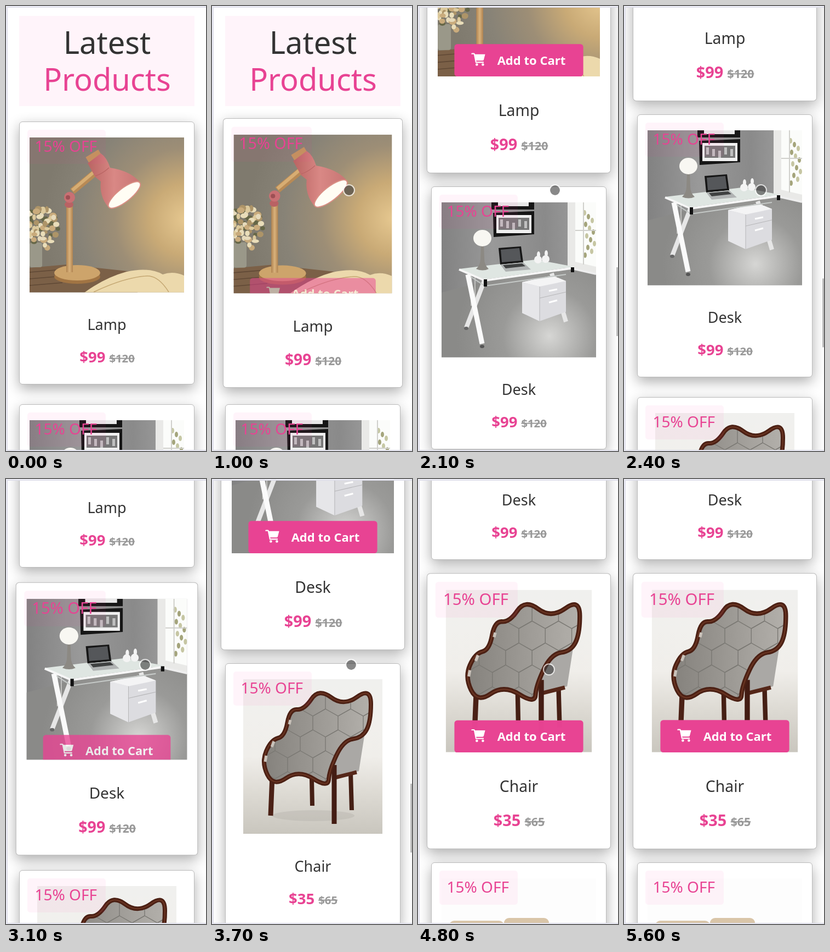
These frames come from a looping animation (365x809 px, 6000 ms). An HTML page:

```html
<!DOCTYPE html>
<html lang="en">
<head>
<meta charset="utf-8">
<title>Latest Products</title>
<style>
  html, body { margin: 0; width: 100%; height: 100%; overflow: hidden; background: #ededf6; }
  #view { position: absolute; left: 2px; top: 2px; width: 363px; height: 806px; overflow: hidden;
    background: #fff; border: 1px solid #d9d9e6; border-right: 0; box-sizing: border-box; }
  #page { position: absolute; left: -3px; top: -3px; width: 365px; height: 2300px; }
  svg { position: absolute; left: 0; top: 0; overflow: visible; font-family: "Noto Sans", "Open Sans", sans-serif; }
  .card { position: absolute; left: 24px; width: 320px; height: 478px; box-sizing: border-box;
    background: #fff; border: 1px solid #bbb; border-radius: 6px; box-shadow: 0 8px 24px rgba(0,0,0,.32); }
  .card svg { left: -1px; top: -1px; }
  .mid { text-anchor: middle; }
  .pink { fill: #e84393; }
  .dark { fill: #333; }
  .old { fill: #999; font-size: 20.3px; text-decoration: line-through; }
  #bar { position: absolute; left: 362px; top: 0; width: 3px; height: 125px; background: #bcbcbc; }
  #dot { position: absolute; left: -11px; top: -11px; width: 18px; height: 18px; border-radius: 50%;
    background: rgba(64,64,64,.62); background-clip: padding-box; border: 2px solid rgba(255,255,255,.7); }
</style>
</head>
<body>
<div id="view"><div id="page">
  <svg width="365" height="200">
    <rect x="24" y="18" width="320" height="164" fill="#ff3399" opacity=".05"/>
    <g font-size="56" class="mid">
      <text x="184.5" y="86.5" class="dark">Latest</text>
      <text x="184.5" y="154" class="pink">Products</text>
    </g>
  </svg>
</div></div>
<div id="bar"></div>
<div id="dot"></div>
<script>
const rect = (x, y, w, h, fill, more = '') =>
  `<rect x="${x}" y="${y}" width="${w}" height="${h}" fill="${fill}" ${more}/>`;
const oval = (x, y, rx, ry, fill, more = '') =>
  `<ellipse cx="${x}" cy="${y}" rx="${rx}" ry="${ry}" fill="${fill}" ${more}/>`;
const shape = (d, fill, more = '') => `<path d="${d}" fill="${fill}" ${more}/>`;
const line = (d, color, w = 1) => shape(d, 'none', `stroke="${color}" stroke-width="${w}"`);
const loop = (n, draw) => Array.from({ length: n }, (_, i) => draw(i)).join('');

// evenly spaced colour stops
const stops = colors => colors.map((c, i) =>
  `<stop offset="${i / (colors.length - 1)}" stop-color="${c}"/>`).join('');
const fade = (id, colors, down) =>
  `<linearGradient id="${id}" ${down ? 'x2="0" y2="1"' : ''}>${stops(colors)}</linearGradient>`;
const glow = (id, x, y, r, ...colors) =>
  `<radialGradient id="${id}" gradientUnits="userSpaceOnUse" cx="${x}" cy="${y}" r="${r}">${stops(colors)}</radialGradient>`;

// closed curve through the midpoints of a rough outline
function blob(p) {
  const mid = i => {
    const a = p[i % p.length], b = p[(i + 1) % p.length];
    return `${(a[0] + b[0]) / 2} ${(a[1] + b[1]) / 2}`;
  };
  return `M${mid(0)}${loop(p.length, i => `Q${p[(i + 1) % p.length]} ${mid(i + 1)}`)}Z`;
}

function flowers() {
  let seed = 7;
  const rnd = () => (seed = seed * 16807 % 2147483647) / 2147483647;
  const tones = ['#e9ddb9', '#c9ab7c', '#e6dabb', '#ad9468', '#dcc99c'];
  return loop(80, i => {
    const a = rnd() * 6.28, r = Math.sqrt(rnd());
    return oval(63 + 33 * r * Math.cos(a), 405 + 38 * r * Math.sin(a), 3 + 4 * rnd(), 3 + 3 * rnd(),
      i < 28 ? '#666747' : tones[i % 5]);
  });
}

const lamp = () => glow('light', 328, 388, 260, '#e6c890', '#c9aa76', '#9d8e76', '#888377', '#7f7a6e')
  + fade('shade', ['#b96462', '#d98885', '#c77573']) + fade('wood', ['#b08350', '#d9b27c', '#b08350'])
  + rect(43, 239, 282, 282, 'url(#light)')
  + shape('M43 476L110 470L240 484V521H43Z', '#7b6047')
  + loop(3, i => line(`M43 ${484 + 12 * i}l60 -5`, '#5f4835', 1.5))
  + rect(43, 430, 23, 45, '#a5a594', 'opacity=".7" rx="4"') + flowers()
  + shape('M143 521Q180 494 220 483Q262 474 286 488Q305 481 325 490V521Z', '#ecd9ac')
  + line('M160 520Q215 494 254 491Q277 488 297 520', '#c5a873', 1.5)
  + oval(130, 492, 42, 13, '#a17443') + oval(130, 485, 42, 14, '#cda46b')
  + rect(110, 362, 12, 122, 'url(#wood)')
  + line('M121 337L166 300', '#b88a55', 12) + line('M121 335L165 298', '#d7ad73', 6)
  + oval(115, 361, 8, 6, '#b96264') + oval(116, 348, 10, 10, '#c97073') + oval(113, 348, 4, 4, '#9e4f54')
  + line('M149 281L172 267', '#c2955d', 14)
  + shape('M149 286L173 268Q184 275 190 294Q228 300 245 321L187 366Q170 346 173 319L163 311Z', 'url(#shade)')
  + line('M163 309Q176 305 188 294', '#b86463', 1.2)
  + oval(216, 343.5, 36, 12, '#fffdf4', 'transform="rotate(-38 216 343.5)" stroke="#d98f84" stroke-width="2"');

const desk = () => fade('wall', ['#828282', '#999', '#8a8a8a', '#a5a5a5'])
  + glow('floor', 240, 600, 170, '#d6d6d4', '#9a9a98', '#8a8a88')
  + rect(43, 357, 282, 282, 'url(#wall)')
  + shape('M43 521L245 468L325 488V639H43Z', 'url(#floor)')
  + shape('M273 357H325V486L273 474Z', '#e9e9e7') + shape('M287 357H325V474L287 465Z', '#fbfcfa')
  + loop(12, i => oval(304 + i * 7 % 19, 376 + i * 7, 3, 5, i % 2 ? '#8f8f5c' : '#b9ba8e', 'opacity=".8"'))
  + line('M302 357V470M287 408H325', '#d0d0cc', 2) + line('M245 469L325 487', '#eee', 4)
  + rect(134, 357, 78, 13, '#161616') + rect(146, 357, 56, 7, '#e8e8e8')
  + shape('M137 376L212 373V415L138 420Z', '#161616') + rect(143, 380, 64, 33, '#f0f0f0')
  + rect(147, 385, 56, 22, '#777') + loop(5, i => rect(150 + i * 11, 388 + i % 3 * 3, 5, 13, '#c0c0c0'))
  + loop(4, i => line(`M${[97, 104, 246, 252][i]} 490v${i < 2 ? 55 : 12}`, '#d0d0ce', 1.5))
  + line('M122 497L88 585M244 486L270 574', '#e6e6e6', 8) + line('M91 488L117 614', '#fafafa', 9)
  + oval(117, 619, 4, 3, '#555') + oval(88, 586, 4, 3, '#666')
  + shape('M190 502L245 490L270 500V556L222 573L190 558Z', '#dcdce0') + shape('M190 502L245 490L270 500L222 510Z', '#f4f4f5')
  + shape('M190 502L222 510V573L190 558Z', '#e6e6e9')
  + line('M222 531L270 520M222 510V573', '#b5b5b7') + line('M239 518l15 -3m-15 24l15 -4', '#fff', 3)
  + shape('M75 478L215 461L285 474L122 497Z', '#dfe6e2') + line('M75 479L122 499L285 476', '#f6f6f6', 4)
  + line('M96 492L122 509L270 488', '#c5c9c7', 2)
  + rect(120, 497, 6, 13, '#111') + rect(279, 475, 6, 9, '#111')
  + shape('M147 440L188 437L192 466L150 470Z', '#161616') + shape('M151 443L185 440L188 463L153 466Z', '#55575a')
  + shape('M150 470L192 466L206 479L160 483Z', '#b0b3b3') + shape('M155 471L190 468L196 473L160 477Z', '#3f4141')
  + shape('M115 434h5l1 25Q121 471 129 478Q118 483 106 478Q114 471 114 459Z', '#8c8983') + oval(117.5, 422, 16.5, 15, '#f8f7f2')
  + loop(2, i => oval(219 + 14 * i, 461 - i, 7, 7, '#f4f4f4') + oval(220 + 14 * i, 452 - 2 * i, 3, 6, '#f4f4f4'));

// honeycomb quilting
const quilt = () => loop(30, i => {
  const x = 92 + i % 5 * 46 + (Math.floor(i / 5) % 2) * 23, y = 380 + Math.floor(i / 5) * 38;
  return line(`M${x} ${y}l23 13v25l-23 13M${x} ${y}l-23 13`, '#7b7974', 1.4);
});

const chair = () => {
  const rim = blob([[90, 515], [108, 474], [133, 468], [142, 418], [168, 420], [195, 380], [240, 414], [290, 378],
    [290, 440], [275, 470], [240, 475], [214, 530], [212, 562], [158, 528], [112, 560]]);
  return fade('room', ['#f0f0ee', '#f1f0ed', '#f0eeea', '#dcd9d2', '#c9c6be'], true)
    + fade('cloth', ['#85827d', '#9c9994', '#b3b0ab'])
    + `<clipPath id="seat">${shape(rim)}</clipPath>`
    + rect(57, 364, 254, 281, 'url(#room)') + oval(185, 612, 75, 10, '#aaa69e', 'opacity=".3"')
    + line('M182 545L183 594M253 533L255 602', '#451f14', 8) + line('M110 540L107 612', '#4b2116', 9)
    + shape('M287 410L268 531L224 545L218 500Z', '#aaa8a5') + line('M220 544L264 533', '#552719', 7)
    + line('M223 520V627', '#431c13', 9)
    + shape(rim, 'url(#cloth)') + `<g clip-path="url(#seat)">${quilt()}</g>`
    + line(rim, '#4b2014', 8) + line(rim, '#6b3522', 2)
    + line('M99 503l-2 11M113 477l-4 10M143 438l-2 8', '#c9c2ba', 5);
};

const sofa = () => rect(43, 726, 282, 281, '#fdfdfd')
  + rect(57, 803, 100, 120, '#d9c5a8', 'rx="9"') + rect(157, 798, 82, 120, '#d9c5a8', 'rx="9"');

const cart = `<g transform="translate(77.5 270)" fill="#fff">
  <path d="M0 1Q0 0 1.5 0H4.5Q6 0 6.3 2H24L21.5 11.5Q21 13 19.5 13H8.4L8.8 15H21.5V17H7.3L4.2 2H0Z"/>
  <circle cx="9.5" cy="20" r="2.2"/><circle cx="20" cy="20" r="2.2"/></g>`;

// each photo is drawn for a card whose top is at "top"
const goods = [
  { name: 'Lamp', price: '$99', old: '$120', photo: lamp, width: 282, top: 210 },
  { name: 'Desk', price: '$99', old: '$120', photo: desk, width: 282, top: 328 },
  { name: 'Chair', price: '$35', old: '$65', photo: chair, width: 254, top: 335 },
  { name: 'Sofa', price: '$99', old: '$120', photo: sofa, width: 282, top: 697 }
];
const page = document.getElementById('page');
const cards = goods.map(({ name, price, old, photo, width, top }, i) => {
  const el = document.createElement('div');
  el.className = 'card';
  el.style.top = 210 + 514 * i + 'px';
  el.innerHTML = `<svg width="320" height="478">
    <clipPath id="pic${i}">${rect(160 - width / 2, 29, width, 281.5)}</clipPath>
    <g clip-path="url(#pic${i})"><g transform="translate(-24 ${-top})">${photo()}</g></g>
    <rect x="15" y="15" width="143" height="62" rx="5" fill="#ff3399" opacity=".05"/>
    <text x="28.5" y="55" font-size="28" class="pink">15% OFF</text>
    <g clip-path="url(#pic${i})"><g class="buy">
      <rect x="48" y="254.5" width="224" height="56" rx="5" class="pink"/>${cart}
      <text x="122.5" y="290" font-size="21" font-weight="600" fill="#fff">Add to Cart</text></g></g>
    <text x="160" y="379" font-size="27" class="mid dark">${name}</text>
    <text x="160.5" y="438" font-size="27.5" font-weight="600" class="mid"><tspan class="pink">${price}</tspan><tspan dx="7" class="old">${old}</tspan></text>
  </svg>`;
  page.append(el);
  return { el, buy: el.querySelector('.buy') };
});

// smooth rise from 0 to 1
function rise(t, from, time = 400) {
  const x = Math.min(1, Math.max(0, (t - from) / time));
  return x * x * (3 - 2 * x);
}
// straight moves between key points [time, x, y]
function along(keys, t) {
  const n = keys.findIndex(k => k[0] > t);
  if (n < 1) return keys.at(n).slice(1);
  const a = keys[n - 1], b = keys[n], p = (t - a[0]) / (b[0] - a[0]);
  return a.slice(1).map((v, i) => v + (b[i + 1] - v) * p);
}

const scroll = [[1350, 0], [1600, 107], [2100, 396], [2400, 527], [3400, 527], [3700, 903], [4000, 1055]];
const touch = [[200, 132, 109], [400, 316, 511], [600, 250, 335], [2500, 250, 335], [2600, 284, 434],
  [2700, 284, 434], [2800, 254, 338], [4300, 254, 338], [4900, 236, 348], [5500, 46, 8]];
const enter = [800, 2820, 4420], leave = [2700, 4300];

const bar = document.getElementById('bar'), dot = document.getElementById('dot');
function draw(t) {
  const [y] = along(scroll, t), [dx, dy] = along(touch, t);
  page.style.transform = `translateY(${-y}px)`;
  cards.forEach(({ el, buy }, i) => {
    const p = i in enter ? rise(t, enter[i]) - (i in leave ? rise(t, leave[i]) : 0) : 0;
    el.style.transform = p ? `scale(${1 + .05 * p})` : 'none';
    buy.setAttribute('transform', `translate(0 ${58 * (1 - p)})`);
    buy.setAttribute('opacity', p);
  });
  bar.style.transform = `translateY(${413.3 + .1558 * y}px)`;
  bar.style.opacity = t < 3500 ? (t >= 1400) - rise(t, 2700, 300) : 1 - rise(t, 4300, 300);
  dot.style.visibility = t >= 200 && t < 5600 ? 'visible' : 'hidden';
  dot.style.transform = `translate(${dx}px,${dy}px)`;
}

const start = performance.now();
function tick(now) {
  const t = Math.max(0, now - start) % 6000;
  draw(Math.floor(t / 100) * 100);
  requestAnimationFrame(tick);
}
draw(0);
requestAnimationFrame(tick);
</script>
</body>
</html>
```
